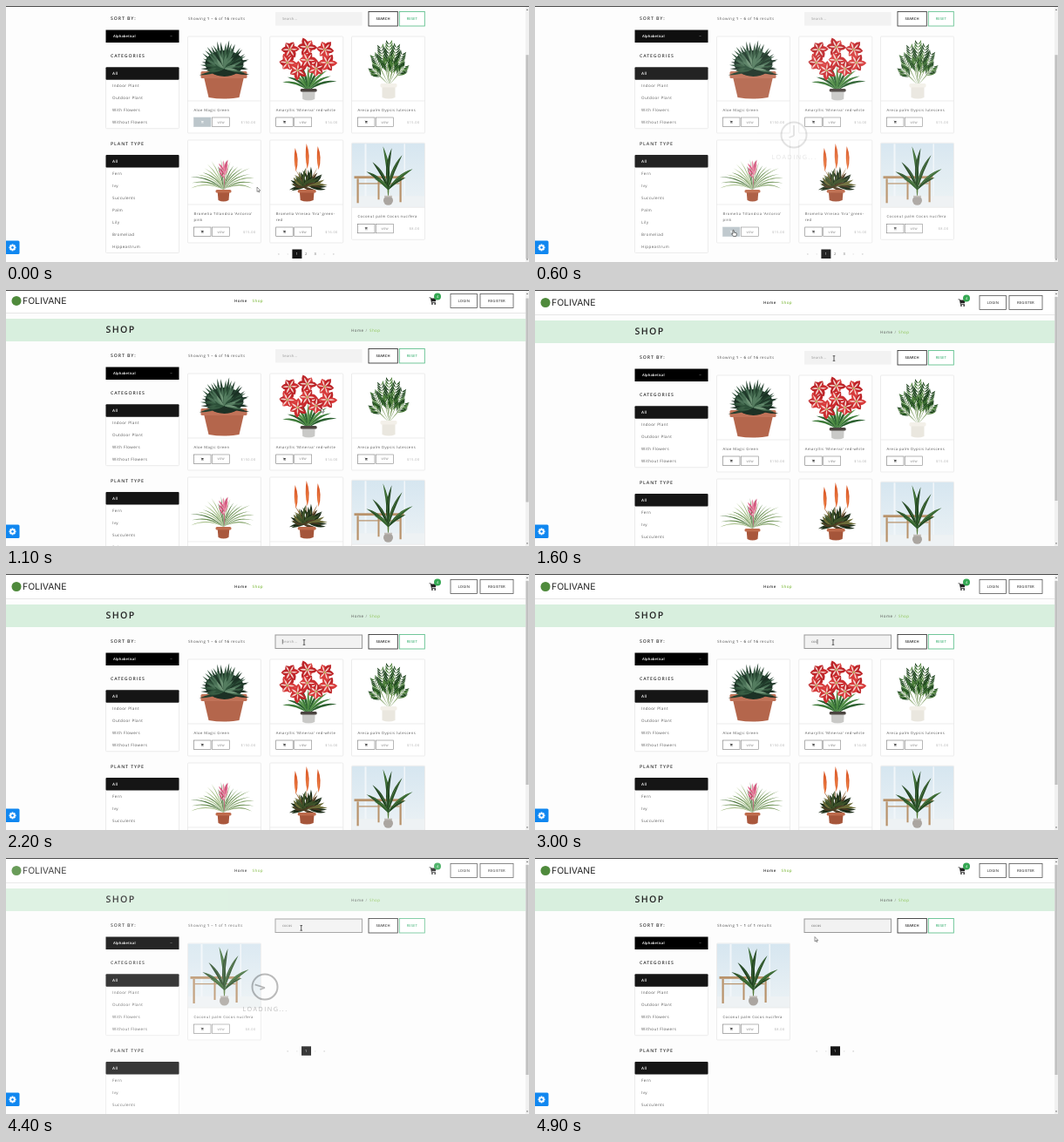
Recreate the animation shown at these times as an HTML page. Size 600x294 px, loop 5000 ms.

```html
<!DOCTYPE html>
<html lang="en">
<head>
<meta charset="utf-8">
<title>Plant shop</title>
<style>
html, body { margin: 0; width: 100%; height: 100%; overflow: hidden; background: #fdfdfd; }
svg { display: block; width: 100%; height: 100%; }
text { font-family: "Open Sans", sans-serif; letter-spacing: .42px; text-rendering: geometricPrecision; white-space: pre; }
.mid { text-anchor: middle; }
.end { text-anchor: end; }
.tight { letter-spacing: .1px; }
.wide { letter-spacing: .9px; font-weight: 600; }
.bold { font-weight: 600; }
.buy rect { fill: #fff; stroke: #777; }
.buy path, .buy circle { fill: #444; }
.buy.pressed rect { fill: #bcc6cb; stroke: #bcc6cb; }
.buy.pressed path, .buy.pressed circle { fill: #eef1f2; }
</style>
</head>
<body>
<svg id="stage" viewBox="0 0 600 294"></svg>
<script>
let seed = 7;
const rnd = () => (seed = seed * 16807 % 2147483647) / 2147483647;
const spread = d => (rnd() - .5) * d;
const pick = list => list[Math.floor(rnd() * list.length)];
const range = n => [...Array(n).keys()];
const draw = (n, fn) => range(n).map(fn).join('');

// Basic shapes
const text = (x, y, s, size = 4.3, fill = '#555', cls = '') =>
  `<text x="${x}" y="${y}" font-size="${size}" fill="${fill}" class="${cls}">${s}</text>`;
const rect = (x, y, w, h, fill, stroke = 'none', sw = .8, r = 0) =>
  `<rect x="${x}" y="${y}" width="${w}" height="${h}" rx="${r}" fill="${fill}" stroke="${stroke}" stroke-width="${sw}"/>`;
const circle = (x, y, r, fill) => `<circle cx="${x}" cy="${y}" r="${r}" fill="${fill}"/>`;
const path = (d, fill, stroke = 'none', sw = 1) =>
  `<path d="${d}" fill="${fill}" stroke="${stroke}" stroke-width="${sw}"/>`;
const group = (x, y, body, attrs = '') => `<g transform="translate(${x} ${y})" ${attrs}>${body}</g>`;
const outlined = (x, y, w, h, label, color, size) =>
  rect(x, y, w, h, '#fff', color, .8) + text(x + w / 2, y + h / 2 + 1.5, label, size, color, 'mid tight bold');
const cartIcon = (x, y, s, fill) =>
  `<g transform="translate(${x} ${y}) scale(${s})">` +
  path('M0 0H2L2.4 1H9L7.8 5H3.3L3.5 6H8V6.8H2.7L1.5 .8H0Z', fill) +
  circle(3.7, 8, 1, fill) + circle(7.2, 8, 1, fill) + '</g>';

// Plant parts
const leaf = (x, y, X, Y, w, bend, fill) => {
  const dx = X - x, dy = Y - y, l = Math.hypot(dx, dy);
  const ctrl = k => `${((x + X) / 2 - dy / l * k).toFixed(1)} ${((y + Y) / 2 + dx / l * k).toFixed(1)}`;
  return path(`M${x} ${y}Q${ctrl(bend + w)} ${X} ${Y}Q${ctrl(bend - w)} ${x} ${y}`, fill);
};
const ray = (x, y, angle, len, w, bend, fill) =>
  leaf(x, y, +(x + len * Math.cos(angle)).toFixed(1), +(y + len * Math.sin(angle)).toFixed(1), w, bend, fill);
const frond = (x, y, X, Y, colors) => {
  const angle = Math.atan2(Y - y, X - x);
  return leaf(x, y, X, Y, .8, 0, '#5d8338') + draw(7, i => {
    const k = .5 + i * .07, px = +(x + (X - x) * k).toFixed(1), py = +(y + (Y - y) * k).toFixed(1);
    return [-1, 1].map(s => ray(px, py, angle + s * .6, 12 - i, 1.5, s * 1.5, pick(colors))).join('');
  });
};
const pot = (x, y, w, h, inset, color, rim) =>
  path(`M${x + 2} ${y}H${x + w - 2}L${x + w - inset} ${y + h - 2}Q${x + w / 2} ${y + h + 1} ${x + inset} ${y + h - 2}Z`, color) +
  rect(x, y, w, h * .25, rim, 'none', 0, 1.5);

const aloe = () => {
  const layer = (n, len, colors) => draw(n, i => {
    const a = -Math.PI * (1.08 - 1.16 * (i + .5) / n) + spread(.15);
    return ray(42, 37, a, len * (.9 + .14 * Math.abs(Math.sin(a))) + spread(4), 2.9, spread(4), pick(colors));
  });
  return pot(15, 40, 53, 32, 9, '#b4664c', '#c07258') +
    '<ellipse cx="42" cy="31" rx="22" ry="15" fill="#1c3125"/>' +
    layer(25, 30, ['#24402f', '#2d5039', '#1a3024']) +
    layer(20, 24, ['#3a5f45', '#1f3829', '#4a7056']) +
    layer(14, 15, ['#557d60', '#2d5039', '#6d9275']);
};

const amaryllis = () => {
  const flower = ([x, y]) => circle(x, y, 6.5, '#b8262a') + draw(6, i => {
    const a = i * Math.PI / 3 + x;
    return ray(x, y, a, 10.5 + spread(3), 6.5, spread(3), pick(['#cb2d30', '#d83b3b', '#bd2529'])) +
      ray(x, y, a, 8.5, 1.8, 0, '#f3d5cf');
  }) + circle(x, y, 1.2, '#b9bd66');
  const greens = ['#3c7a38', '#2a5f2e', '#559248'];
  return draw(11, i => {
    const a = -Math.PI * (.9 - .8 * i / 10);
    return ray(44, 62, a, 31 + spread(7), 2.6, -Math.cos(a) * 7, greens[i % 3]);
  }) + pot(35, 60, 19, 14, 2.5, '#c9c9c7', '#4b4440') +
    [[20, 30], [66, 30], [32, 39], [53, 37], [23, 15], [63, 15], [43, 12], [43, 27]].map(flower).join('');
};

const areca = () =>
  [[23, 36], [62, 33], [25, 21], [59, 18], [33, 10], [52, 9], [43, 5], [40, 25], [49, 28]]
    .map(([x, y]) => frond(43, 56, x, y, ['#234f20', '#35692c', '#4b7f38', '#1b401b'])).join('') +
  pot(33, 54, 19, 18, 2, '#eae7df', '#f3f0e9');

const tillandsia = () => draw(20, i => {
  const a = -Math.PI * (i + .3) / 19.6, len = 31 + 6 * Math.abs(Math.cos(a)) + spread(10);
  return ray(41, 57, a, len, 1.1, -Math.cos(a) * 9, pick(['#6d9256', '#8aa870', '#4f7840', '#a3bd85']));
}) + leaf(42, 57, 42, 36, 1, 0, '#c06a80') +
  draw(9, i => ray(42, 44 - i * 1.4, -1.7 + (i % 3 - 1) * .5, 11, 2, 0, pick(['#dd5f86', '#cf4a75', '#e88ba6']))) +
  pot(32, 57, 18, 14, 3, '#a9573c', '#bf6c4d');

const vriesea = () =>
  [[29, 9, 36], [42, 4, 33], [55, 7, 34]].map(([x, top, end]) =>
    leaf(42, 55, x, end - 3, 1, 0, '#8a5a2c') + leaf(x + 1, end, x, top, 3.8, 1, '#dc5c2a') +
    leaf(x + 1, end, x + .5, top + 6, 1.4, 0, '#ef8547')).join('') +
  draw(46, i => {
    const a = -Math.PI * (1.1 - 1.2 * (i + .5) / 46);
    return ray(42 + spread(10), 53, a, 17 + spread(11), 3, spread(7), pick(['#26381f', '#3d5229', '#4f3c24', '#1b2c18', '#6b6b38']));
  }) + pot(32, 57, 21, 14, 3, '#a5553a', '#bd6a4b');

const coconut = () => {
  const wood = (x, y, w, h) => rect(x, y, w, h, '#b8926a');
  const tips = [[17, 33], [70, 30], [24, 22], [58, 14], [36, 4], [46, 6], [62, 40], [26, 41]];
  return rect(.5, .5, 83, 73, 'url(#room)') + rect(.5, 61, 83, 12.5, '#eef2f4') +
    rect(15, 1, 2, 60, '#f1f6f9') + rect(60, 1, 1.5, 60, '#f1f6f9') +
    wood(3, 38, 57, 2.8) + wood(6, 41, 2.2, 28) + wood(30, 41, 2, 24) + wood(55, 41, 2.2, 27) + wood(8, 46, 47, 1.2) +
    leaf(42, 64, 42, 36, 2, 0, '#557a38') +
    tips.map(([x, y], i) => leaf(42, 54, x, y, 3.5, Math.sign(42 - x) * 5, ['#264d25', '#356530', '#1d3f1e'][i % 3]) +
      leaf(42, 52, x, y, .5, Math.sign(42 - x) * 5, '#648f50')).join('') +
    circle(42, 66, 5.5, '#aaa5a0') + rect(37.5, 60.5, 9, 1.6, '#c3beb8');
};

// Page parts
const card = (x, y, art, title, price, id = '') => {
  const extra = 7 * (title.length - 1), by = 93 + extra;
  return group(x, y,
    rect(0, 0, 84, 111 + extra, '#fff', '#e4e4e4', .7, 1) + art() +
    path('M0 74H84', 'none', '#e4e4e4', .7) +
    title.map((line, i) => text(7, 86 + 7 * i, line, 4.2)).join('') +
    `<g class="buy" ${id && `id="${id}"`}>` + rect(7, by, 19.5, 10.5, '#fff', '#777', .6) +
    cartIcon(15, by + 3.7, .36, '#444') + '</g>' +
    rect(28, by, 20, 10.5, '#fff', '#888', .6) + text(38, by + 6.5, 'VIEW', 3.3, '#777', 'mid tight') +
    text(78, by + 6.7, price, 3.8, '#aaa', 'end'));
};
const menu = (y, items) =>
  rect(114.5, y, 84, 14 * items.length + .5, '#fff', '#e4e4e4', .7, 1) +
  rect(114.5, y, 84, 14.5, '#151515', 'none', 0, 1) +
  items.map((s, i) => text(122, y + 9 + 14 * i, s, 4.5, i ? '#555' : '#fff', i ? '' : 'bold')).join('');
const pager = (cx, y, pages) => {
  const left = cx - (pages - 1) * 5.3;
  const labels = ['«', '‹', ...range(pages).map(i => i + 1), '›', '»'];
  return rect(left - 5.3, y, 11, 10.5, '#151515') + labels.map((s, i) =>
    text(left + (i - 2) * 10.5, y + 6.8, s, 4, i === 2 ? '#fff' : i < 2 || i > pages + 1 ? '#aaa' : '#555', 'mid tight')).join('');
};
const showing = (to, total) =>
  text(209, 79.3, `Showing <tspan class="bold">1 – ${to}</tspan> of <tspan class="bold">${total}</tspan> results`, 4.4);

const header = rect(0, 0, 600, 28, '#fff') + path('M0 28.5H600', 'none', '#e6e6e6') +
  circle(12, 14.5, 5.5, '#4f8a3c') +
  `<text x="19" y="18.4" font-size="10.4" fill="#222" style="font-family:Inter,sans-serif;letter-spacing:0">FOLIVANE</text>` +
  text(262, 16.2, 'Home', 4.5, '#333', 'bold') + text(282.5, 16.2, 'Shop', 4.5, '#8cc152', 'bold') +
  cartIcon(485.5, 10.5, .93, '#222') + circle(495, 9.5, 4, '#35a853') + text(495.2, 11, '4', 4, '#fff', 'mid tight') +
  outlined(510, 6.5, 30.5, 16, 'LOGIN', '#555', 4.2) + outlined(544, 6.5, 38, 16, 'REGISTER', '#555', 4.2) +
  rect(0, 35, 600, 26, '#d8efde') +
  `<text x="114.5" y="50.8" font-size="10.6" fill="#222" class="bold" style="letter-spacing:1.4px">SHOP</text>` +
  text(396, 50, 'Home', 4.5, '#555') + text(412.5, 50, '/', 4.5, '#888') + text(417, 50, 'Shop', 4.5, '#8cc152');

const sidebar = text(120, 79.2, 'SORT BY:', 5.2, '#333', 'wide') +
  rect(114.5, 90.5, 84, 14.5, '#000') + text(123, 99.3, 'Alphabetical', 4.1, '#fff', 'tight bold') +
  path('M188.5 97l1 1 1-1', 'none', '#777', .6) +
  text(120, 122.2, 'CATEGORIES', 5.2, '#333', 'wide') +
  menu(133.2, ['All', 'Indoor Plant', 'Outdoor Plant', 'With Flowers', 'Without Flowers']) +
  text(120, 222.9, 'PLANT TYPE', 5.2, '#333', 'wide') +
  menu(234, ['All', 'Fern', 'Ivy', 'Succulents', 'Palm', 'Lily', 'Bromeliad', 'Hippeastrum']);

const search = `<rect id="input" x="309" y="70" width="99.5" height="15.5" fill="#f2f2f2" stroke-width="1"/>` +
  `<text id="query" x="317" y="79.3" font-size="4.1" class="tight"></text>` +
  `<path id="caret" d="M0 75v5.5" stroke="#333" stroke-width=".6"/>` +
  outlined(416, 69.5, 33.3, 16.5, 'SEARCH', '#222', 4.1) + outlined(451.3, 69.5, 29, 16.5, 'RESET', '#4fb981', 4.1);

const cocosTitle = ['Coconut palm Cocos nucifera'];
const allPlants = showing(6, 16) +
  card(208.5, 98, aloe, ['Aloe Magic Green'], '$150.00', 'first') +
  card(302.7, 98, amaryllis, ["Amaryllis 'Minerva' red-white"], '$14.00') +
  card(396.5, 98, areca, ['Areca palm Dypsis lutescens'], '$15.00') +
  card(208.5, 217, tillandsia, ["Bromelia Tillandsia 'Antonio'", 'pink'], '$15.00', 'second') +
  card(302.7, 217, vriesea, ["Bromelia Vriesea 'Era' green-", 'red'], '$16.00') +
  card(396.5, 220.3, coconut, cocosTitle, '$8.00') + pager(344.3, 342.5, 3);
const found = showing(1, 1) + card(208.5, 98, coconut, cocosTitle, '$8.00') + pager(344.3, 216.3, 1);

const loader = rect(0, 0, 600, 294, 'rgba(255,255,255,.5)') +
  '<circle cx="297" cy="148" r="14.5" fill="none" stroke="#222" stroke-width="2"/>' +
  '<path id="hand" d="M297 149V137" stroke="#222" stroke-width="1.8"/>' +
  path('M297 149L291.5 151', 'none', '#222', 1.8) +
  `<text x="297.5" y="176" font-size="7.2" class="mid" fill="#222" style="letter-spacing:1.5px">LOADING...</text>`;

const gear = rect(-2, 269.5, 17.5, 15.5, '#1087f0', 'none', 0, 1.5) +
  draw(4, i => `<rect x="6.6" y="273.4" width="1.8" height="8" fill="#fff" transform="rotate(${i * 45} 7.5 277.4)"/>`) +
  circle(7.5, 277.4, 3, '#fff') + circle(7.5, 277.4, 1.3, '#1087f0');
const scrollbar = rect(596, 0, 4, 294, '#f1f1f1') +
  '<rect id="thumb" x="596.4" width="3.2" fill="#c1c1c1"/>' +
  path('M597 5l1-1.4 1 1.4ZM597 290.5l1 1.4 1-1.4Z', '#555');

const cursors = {
  arrow: path('M0 0V5.4L1.3 4.2 2.1 6.1 2.9 5.7 2.1 4H3.8Z', '#fff', '#333', .5),
  pointer: path('M0 0Q1 -.6 1.2 .4V2.6L4 3.2Q4.6 3.6 4.2 5.4L3.6 7H.6L-1.4 4.2Q-1 3.4 0 4.2Z', '#fff', '#222', .6),
  beam: path('M-1.3 -2.8H1.3M0 -2.8V2.8M-1.3 2.8H1.3', 'none', '#222', .7)
};

const $ = id => document.getElementById(id);
const set = (id, attrs) => { for (const k in attrs) $(id).setAttribute(k, attrs[k]); };
const show = (id, on) => set(id, { visibility: on ? 'visible' : 'hidden' });

$('stage').innerHTML =
  '<defs><linearGradient id="room" x2="0" y2="1"><stop stop-color="#d6e6f0"/><stop offset="1" stop-color="#ecf2f5"/></linearGradient></defs>' +
  rect(0, 0, 600, 294, '#fdfdfd') +
  group(0, 0, header + sidebar + search + `<g id="all">${allPlants}</g><g id="found">${found}</g>`, 'id="page"') +
  `<g id="loader">${loader}</g>` + gear + scrollbar + rect(0, 0, 600, 1, '#4a4a4a') +
  Object.keys(cursors).map(k => `<g id="${k}">${cursors[k]}</g>`).join('');

// Motion
const smooth = u => u * u * (3 - 2 * u);
const cubic = u => u < .5 ? 4 * u ** 3 : 1 - 4 * (1 - u) ** 3;
const track = (keys, t, col = 1, ease = smooth) => {
  const i = keys.findIndex(k => k[0] > t);
  if (i < 0) return keys[keys.length - 1][col];
  if (!i) return keys[0][col];
  const a = keys[i - 1], b = keys[i];
  return a[col] + (b[col] - a[col]) * ease((t - a[0]) / (b[0] - a[0]));
};
const scrollKeys = [[700, 63], [1200, 0]];
const mouseKeys = [[0, 288, 208], [300, 227, 257.5], [600, 227, 257.5], [900, 360, 174],
  [1200, 362, 122], [1600, 343, 78.5], [2000, 342, 78.5], [4300, 342, 78.5], [4700, 321, 90.5]];
const fadeKeys = [[400, 0], [500, .3], [600, .12], [700, 0], [4200, 0], [4400, .3], [4500, .12], [4600, 0]];
const typed = [2600, 2800, 3000, 3600, 3900];

function render(t) {
  const scroll = track(scrollKeys, t, 1, cubic);
  const done = t >= 4400, focus = t >= 1900;
  set('page', { transform: `translate(0 ${-scroll})` });
  set('thumb', { y: 8 + scroll * .765, height: done ? 241 : 234 });
  show('all', !done);
  show('found', done);

  $('first').classList.toggle('pressed', t < 400);
  $('second').classList.toggle('pressed', t >= 400 && t < 1300);

  const count = typed.filter(k => k <= t).length;
  set('input', { stroke: focus ? '#999' : 'none' });
  set('query', { fill: count ? '#666' : '#999' });
  $('query').textContent = count ? 'cocos'.slice(0, count) : 'Search...';
  const lastKey = count ? typed[count - 1] : 1900;
  show('caret', focus && t < 4200 && (t - lastKey) % 1000 < 500);
  set('caret', { transform: `translate(${317.3 + (count ? $('query').getComputedTextLength() : 0)} 0)` });

  set('loader', { opacity: track(fadeKeys, t) });
  set('hand', { transform: `rotate(${(t - 600) * .36} 297 149)` });

  const x = track(mouseKeys, t), y = track(mouseKeys, t, 2), py = y + scroll;
  const kind = x > 309 && x < 408 && py > 70 && py < 85.5 ? 'beam'
    : x > 215 && x < 235 && py > 317 && py < 328 ? 'pointer' : 'arrow';
  for (const k in cursors) show(k, k === kind);
  set(kind, { transform: `translate(${x} ${y})` });
}

(function tick() {
  render(Math.floor(performance.now() % 5000 / 100) * 100);
  requestAnimationFrame(tick);
})();
</script>
</body>
</html>
```
